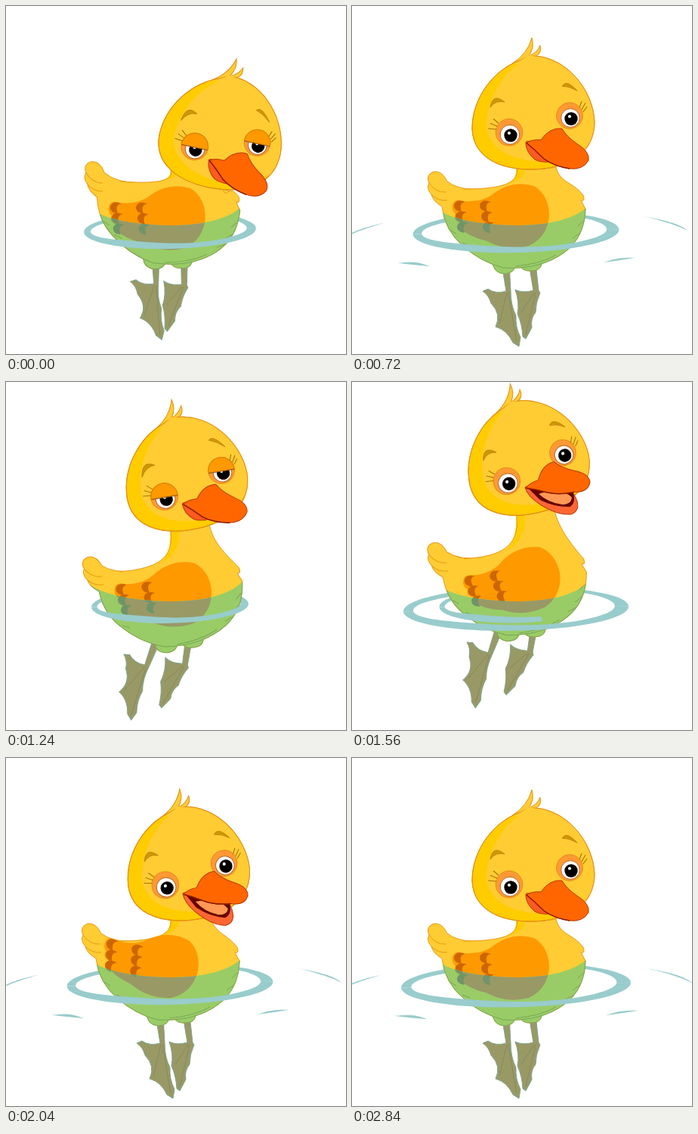
These frames come from a looping animation (450x460 px, 2880 ms). An HTML page with a canvas:

```html
<!DOCTYPE html>
<html lang="en">
<head>
<meta charset="utf-8">
<title>Swimming duckling</title>
<style>
html, body { margin: 0; width: 100%; height: 100%; overflow: hidden; background: #fff; }
canvas { display: block; }
</style>
</head>
<body>
<canvas id="stage" width="450" height="460"></canvas>
<script>
const ctx = document.getElementById('stage').getContext('2d');
const LOOP = 2880, STEP = 40, RAD = Math.PI / 180;
const HEAD = [249, 159], BODY = [215, 280], WING = [210, 275];
const LEFT_HIP = [203, 350], RIGHT_HIP = [239, 350], JAW = [232, 181];

const dry = { body: '#ffcc33', shade: '#ffcc00', line: '#e79a18', wing: '#ff9900', notch: '#cc6600' };
const wet = { body: '#99cc66', shade: '#99cc66', line: '#79a65a', wing: '#999966', notch: '#6f9468' };

// Eased 0 to 1 between two times
function ramp(t, from, to) {
  const u = Math.min(1, Math.max(0, (t - from) / (to - from)));
  return u * u * (3 - 2 * u);
}

// Moods blend into [dx, dy, degrees] for each part
function poseAt(t) {
  const droop = 1 - ramp(t, 0, 700);
  const rise = ramp(t, 860, 1090) - ramp(t, 1090, 1240) / 2 + ramp(t, 1240, 1540) / 2 - ramp(t, 1580, 1840);
  const doze = ramp(t, 1120, 1240) - ramp(t, 1240, 1540);
  const happy = ramp(t, 1580, 1840) - ramp(t, 2480, 2780);
  return {
    head: [42.5 * droop - 5.5 * rise + 2.5 * doze + 2 * happy, 27.5 * droop - 44 * rise - 2.5 * happy,
      12 * droop - 11.5 * rise - 3.5 * doze - 5 * happy],
    body: [2 * rise + 4 * doze, -5 * droop - 12 * rise + 9 * doze, 4.5 * droop - 3 * rise - 3.5 * doze],
    wing: [3 * droop + 13 * rise - 6 * happy, 8 * droop - 2 * rise + 2 * doze - 4 * happy,
      -4 * droop - 8 * rise + 4 * doze + 12 * happy],
    leftLeg: [-6 * droop - 12 * rise - 2 * doze, -10 * droop - 17 * rise + 8 * doze, 5 * droop + 26 * rise + 14 * doze],
    rightLeg: [-4 * droop + doze, -8 * droop - 20 * rise + 7 * doze, 8 * droop + 17 * rise + 8 * doze],
    lid: 1 - ramp(t, 60, 220) + ramp(t, 1100, 1200) - ramp(t, 1270, 1400),
    mouth: ramp(t, 1300, 1500) - .35 * ramp(t, 2200, 2480) - .65 * ramp(t, 2480, 2760)
  };
}

function placed([px, py], [dx, dy, deg], draw) {
  ctx.save();
  ctx.translate(px + dx, py + dy);
  ctx.rotate(deg * RAD);
  ctx.translate(-px, -py);
  draw();
  ctx.restore();
}

function movedPoint([px, py], [dx, dy, deg], x, y) {
  const c = Math.cos(deg * RAD), s = Math.sin(deg * RAD);
  return [px + dx + (x - px) * c - (y - py) * s, py + dy + (x - px) * s + (y - py) * c];
}

function shape(d, fill, stroke, width = 1) {
  const path = new Path2D(d);
  if (fill) { ctx.fillStyle = fill; ctx.fill(path); }
  if (stroke) { ctx.strokeStyle = stroke; ctx.lineWidth = width; ctx.stroke(path); }
}

function disc(x, y, r, fill, stroke) {
  ctx.beginPath();
  ctx.arc(x, y, r, 0, 7);
  ctx.fillStyle = fill;
  ctx.fill();
  if (stroke) { ctx.strokeStyle = stroke; ctx.lineWidth = 1; ctx.stroke(); }
}

// Part of a ring, wider at the sides and thinner at the back
function band(from, to, rx, ry, sideWidth, width, taper) {
  const outer = [], inner = [];
  for (let i = 0; i <= 40; i++) {
    const a = (from + (to - from) * i / 40) * RAD, c = Math.cos(a), s = Math.sin(a);
    const thick = (1 + .2 * Math.sin(3 * a + 1)) * (taper ? Math.sin(Math.PI * i / 40) : 1);
    outer.push([rx * c, ry * s]);
    inner.unshift([(rx - sideWidth * thick) * c, (ry - width * thick * (.75 + .25 * s)) * s]);
  }
  ctx.beginPath();
  outer.concat(inner).forEach(p => ctx.lineTo(...p));
  ctx.fill();
}

function ring(age, reach, power, opensLeft, front) {
  if (age < 0) return;
  const rx = 100 + reach * (age / 1000) ** power, ry = 11 + .12 * rx;
  const life = (rx - 100) / 140;
  const width = Math.max(3.5, 8.5 * (1 - life ** 4));
  const sideWidth = width * (1 + 2.5 * life);
  if (life > 1.3) return;

  ctx.save();
  ctx.translate(217, 285 + .1 * rx);
  ctx.rotate(-.022);
  if (life > .75) {
    for (const side of [-1, 1]) {
      const [middle, near, far] = front ? [90, 30, 43] : [270, 48, 82];
      band(middle + side * near, middle + side * far, rx, ry, width, width, true);
    }
  } else if (opensLeft && life < .12) {
    band(front ? 70 : 180, front ? 180 : 250, rx, ry, sideWidth, width, false);
  } else {
    band(front ? 0 : 180, front ? 180 : 360, rx, ry, sideWidth, width, false);
  }
  ctx.restore();
}

function ripples(t, front) {
  const age = t < 1200 ? t + 120 : t - 1200;
  ctx.fillStyle = '#99cccc';
  ring(age, 159, 1.15, false, front);
  ring(age - 300, 89, 1.45, true, front);
  ring(age - 1060, 100, 1.2, true, front);
}

function legs({ leftLeg, rightLeg }) {
  const fill = '#999966', edge = '#7fa58c', crease = '#858558';
  placed(RIGHT_HIP, rightLeg, () => {
    shape('M234 340L243 340L247 376L249 379Q243 392 243 405Q236 413 238 425L230 440L226 437Q225 420 219 407Q222 392 216 375Q226 380 240 376Z', fill, edge);
    shape('M243 379L230 434M241 379L224 405', null, crease, .8);
  });
  placed(LEFT_HIP, leftLeg, () => {
    shape('M198 340L208 340L210 376Q210 396 217 409Q216 424 223 438L221 450L213 445Q205 428 190 424Q198 407 184 393Q181 382 173 377L180 374Q190 381 204 377Z', fill, edge);
    shape('M207 379L218 443M205 379L195 420', null, crease, .8);
  });
}

function neck({ head, body }, c) {
  const at = (x, y) => movedPoint(BODY, body, x, y);
  const hy = HEAD[1] + head[1], leftY = Math.min(hy + 48, 212);
  const rightX = 269 + head[0] * .4, rightY = hy + 50;
  const tuckY = leftY + .7 * (at(200, 240)[1] - leftY);
  const back = at(148, 242);
  const backCurve = [...at(210, 242), 225, tuckY, 216, leftY];
  const chestCurve = [rightX + 5, rightY + 26, ...at(290, 230), ...at(306, 250)];

  ctx.beginPath();
  ctx.moveTo(...back);
  ctx.bezierCurveTo(...backCurve);
  ctx.lineTo(rightX, rightY);
  ctx.bezierCurveTo(...chestCurve);
  ctx.lineTo(...at(290, 290));
  ctx.lineTo(...at(160, 290));
  ctx.fillStyle = c.body;
  ctx.fill();

  ctx.beginPath();
  ctx.moveTo(216, leftY);
  ctx.quadraticCurveTo(222, tuckY, ...at(202, 236));
  ctx.quadraticCurveTo(235, tuckY, 228, leftY);
  ctx.fillStyle = c.shade;
  ctx.fill();

  ctx.strokeStyle = c.line;
  ctx.lineWidth = 1;
  ctx.beginPath();
  ctx.moveTo(...back);
  ctx.bezierCurveTo(...backCurve);
  ctx.moveTo(rightX, rightY);
  ctx.bezierCurveTo(...chestCurve);
  ctx.stroke();
}

function torso(pose, c) {
  placed(BODY, pose.body, () => {
    shape('M186 334Q185 353 202 354Q215 353 216 343M222 343Q226 351 238 350Q249 350 251 341', c.body, c.line);
    shape('M126 232Q119 217 108 219Q97 223 102 234Q98 241 105 249Q107 258 119 265Q123 298 148 318Q170 338 200 346Q250 349 282 325Q308 305 309 268L303 257Q309 259 306 250L290 242L160 242Q140 242 126 232Z', c.body, c.line);
    shape('M102 234Q111 247 125 246M105 249Q113 258 126 257', null, c.line);
    shape('M306 284L299 291M302 300L292 307M293 314L282 319M270 329Q250 341 216 344M130 296L138 301M146 313L156 317', null, c.line);
  });
  neck(pose, c);
  placed(BODY, pose.body, () => placed(WING, pose.wing, () => {
    shape('M133 264Q135 253 149 258Q174 260 190 246Q214 230 241 238Q261 250 261 278Q258 306 234 317Q204 325 177 310Q150 304 141 290L148 288Q132 284 137 275Q132 270 133 264Z', c.wing);
    for (let row = 0; row < 3; row++) {
      for (const x of [135, 169]) {
        shape(`M${x + 2 * row} ${263 + 14 * row}q3 -9 15 -4q-9 1 -5 13q-10 -1 -10 -9`, c.notch);
      }
    }
  }));
}

function submergedTorso(pose) {
  ctx.save();
  ctx.beginPath();
  ctx.moveTo(96, 255);
  ctx.quadraticCurveTo(122, 288, 215, 290);
  ctx.quadraticCurveTo(295, 290, 318, 258);
  ctx.lineTo(330, 365);
  ctx.lineTo(90, 365);
  ctx.clip();
  torso(pose, wet);
  ctx.restore();
}

function eye(x, y, r, lid) {
  disc(x - 1, y - 3, r + 5, '#ff9933', '#e58b1c');
  disc(x, y, r, '#fff', '#b5692c');
  disc(x + 1, y + 1, 8.7, '#200');
  disc(x + 1, y + 1, 7.5, '#000');
  disc(x - 1, y - 2, 2.1, '#fff');
  if (!lid) return;
  const edge = y - 16 + 14 * lid;
  ctx.save();
  ctx.beginPath();
  ctx.rect(x - 30, y - 40, 60, edge - y + 40);
  ctx.clip();
  disc(x - 1, y - 3, r + 5, '#ff9900', '#d97d0c');
  ctx.restore();
  const half = Math.sqrt(Math.max(0, (r + 5) ** 2 - (edge - y + 3) ** 2));
  shape(`M${x - 1 - half} ${edge}H${x - 1 + half}`, null, '#9c5a16', 1.2);
}

function beak(open) {
  const edge = '#b83a00';
  placed(JAW, [0, 0, -16 * (1 - open)], () => {
    shape('M230 180Q231 192 244 205Q264 225 283 227Q297 224 293 207L289 194L232 179Z', '#ff6633', edge);
    shape('M234 182L290 194Q294 213 283 217Q262 213 246 200Z', '#660000');
    shape('M246 192Q276 189 288 205Q286 214 274 212Q256 206 246 192Z', '#ff9955');
  });
  if (open < .15) shape('M230 182Q231 194 242 203Q250 207 262 206L254 198L234 179Z', '#ff5a1f', edge);
  placed(JAW, [0, 0, -10 * open], () => {
    const lift = 6 * open;
    const underside = `Q268 ${212 - lift} 254 ${202 - lift}Q242 ${190 - lift / 2} 231 181`;
    shape(`M231 181Q238 176 250 177Q262 160 278 162Q284 173 299 183Q315 193 313 204Q306 217 288 ${215 - lift}${underside}Z`, '#ff6600', edge);
    shape(`M288 ${215 - lift}${underside}`, null, '#8c1a00', 1.5);
  });
}

function head(pose) {
  const { lid, mouth } = pose;
  placed(HEAD, pose.head, () => {
    const line = '#e28f12', skull = 'M222 72C188 84 159 121 159 162C160 199 194 216 236 216C286 216 321 195 321 153C319 110 283 67 240 66Q230 67 222 72Z';
    shape('M212 76Q232 64 238 42Q242 55 234 66Q245 62 249 52Q252 64 240 68L225 78Z', '#ffcc33', line);
    shape(skull, '#ffcc00', line);
    ctx.save();
    ctx.clip(new Path2D(skull));
    shape('M240 66C202 80 179 120 178 158C180 184 203 202 242 205C276 206 302 196 325 172L330 60Z', '#ffcc33');
    ctx.restore();
    shape(skull, null, line);
    shape('M213 77Q229 69 234 65L242 66L232 74Z', '#ffcc33');

    eye(209, 170, 12.8, lid);
    eye(289, 148, 12.3, lid);
    shape('M192 159L183 155M191 163L180 162M194 155L187 149M304 137L309 128M306 140L311 133M301 134L304 126', null, '#a8760c', 1.1);

    const sag = lid * 3;
    shape(`M183 ${134 + sag}Q186 114 202 ${127 - sag}Q190 124 183 ${134 + sag}Z`, '#cc9900', '#c07a10', .8);
    shape(`M278 ${106 - sag}Q284 96 298 ${112 + sag}Q288 106 278 ${106 - sag}Z`, '#cc9900', '#c07a10', .8);
    beak(mouth);
  });
}

function draw(t) {
  const pose = poseAt(t);
  ctx.fillStyle = '#fff';
  ctx.fillRect(0, 0, 450, 460);
  ripples(t, false);
  legs(pose);
  torso(pose, dry);
  submergedTorso(pose);
  head(pose);
  ripples(t, true);
}

function tick() {
  draw(Math.floor(performance.now() % LOOP / STEP) * STEP);
  requestAnimationFrame(tick);
}
tick();
</script>
</body>
</html>
```
